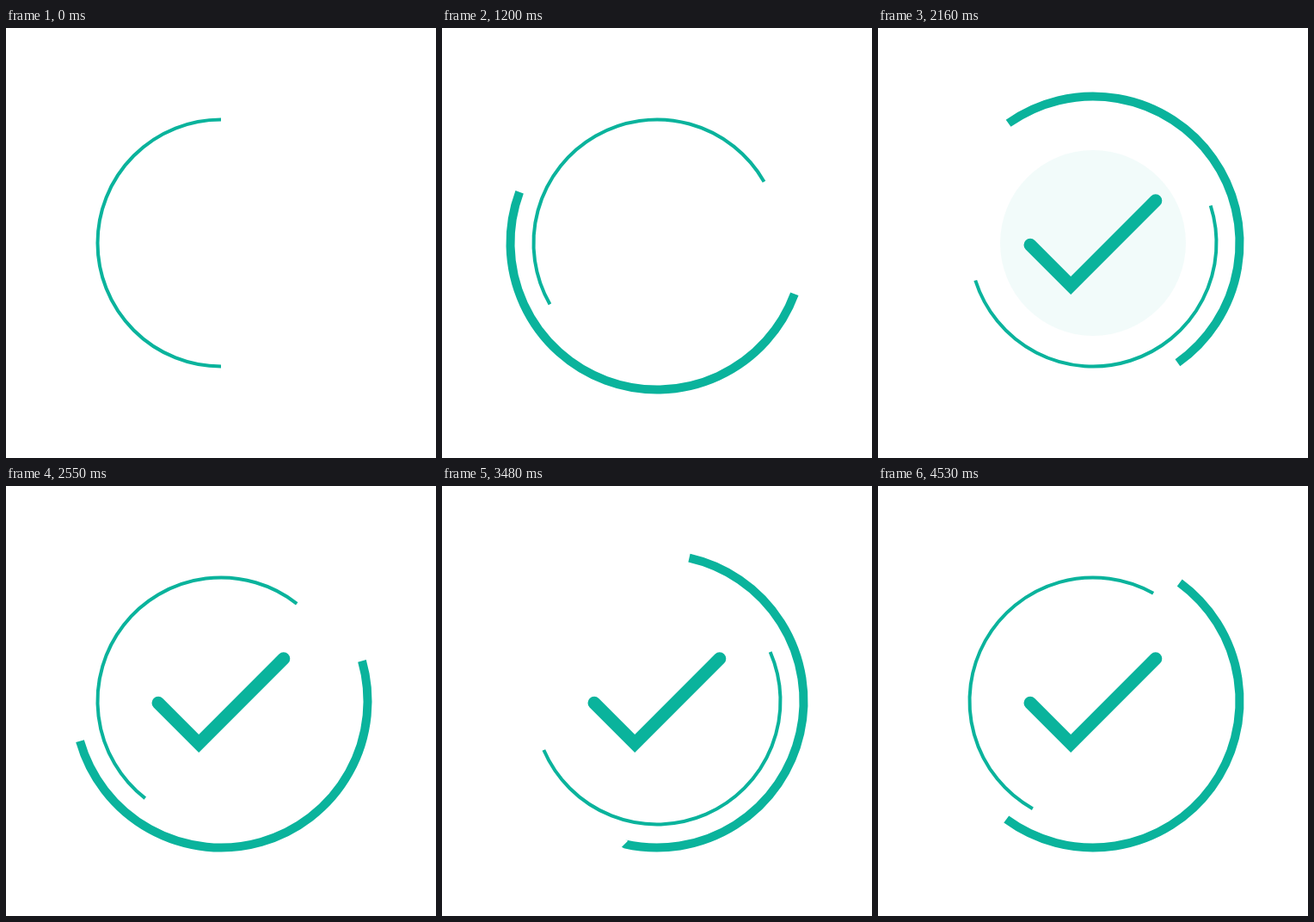
Write an HTML page with a canvas that moves like this. It is 500 px wide and 500 px high and loops after 4.56 s.

```html
<!DOCTYPE html>
<html>
<head>
<meta charset="utf-8">
<style>
html, body { margin: 0; width: 100%; height: 100%; overflow: hidden; background: #fff; }
canvas { display: block; width: 500px; height: 500px; }
</style>
</head>
<body>
<canvas id="stage" width="500" height="500"></canvas>
<script>
const ctx = document.getElementById('stage').getContext('2d');
const LOOP = 4560, STEP = 30, CENTER = 250;
const COLOR = '#0ab39c';
const CHECK = [[177, 252.3], [224.2, 299.5], [322.8, 200.8]];

const clamp = v => Math.min(1, Math.max(0, v));
const smooth = p => p * p * (3 - 2 * p);

// Half ring whose middle points at the given angle (degrees, clockwise from east).
function halfRing(radius, width, degrees) {
  const mid = degrees * Math.PI / 180;
  ctx.lineWidth = width;
  ctx.lineCap = 'butt';
  ctx.beginPath();
  ctx.arc(CENTER, CENTER, radius, mid - Math.PI / 2, mid + Math.PI / 2);
  ctx.stroke();
}

// Starts at rest and approaches a constant top speed.
function outerAngle(steps) {
  const tau = 80, topSpeed = 13.568;
  return topSpeed * (steps - tau * (1 - Math.exp(-steps / tau)));
}

function ripple(progress) {
  if (progress <= 0 || progress >= 1) return;
  const peak = 0.6;
  const fade = progress < peak ? progress / peak : (1 - progress) / (1 - peak);
  ctx.globalAlpha = 0.21 * fade;
  ctx.beginPath();
  ctx.arc(CENTER, CENTER, 120 * progress, 0, 2 * Math.PI);
  ctx.fill();
  ctx.globalAlpha = 1;
}

function checkMark(progress) {
  if (progress <= 0) return;
  const [a, b, c] = CHECK;
  const first = Math.hypot(b[0] - a[0], b[1] - a[1]);
  const second = Math.hypot(c[0] - b[0], c[1] - b[1]);
  const drawn = progress * (first + second);
  const toward = (p, q, k) => ctx.lineTo(p[0] + (q[0] - p[0]) * k, p[1] + (q[1] - p[1]) * k);
  ctx.lineWidth = 15;
  ctx.lineCap = 'round';
  ctx.lineJoin = 'miter';
  ctx.beginPath();
  ctx.moveTo(...a);
  toward(a, b, clamp(drawn / first));
  if (drawn > first) toward(b, c, clamp((drawn - first) / second));
  ctx.stroke();
}

function draw(step) {
  ctx.fillStyle = '#fff';
  ctx.fillRect(0, 0, 500, 500);
  ctx.fillStyle = ctx.strokeStyle = COLOR;
  ripple((step - 45.7) / 18);
  ripple((step - 55.8) / 18);
  halfRing(143.5, 4, 180 - 16.495 * step);
  if (step >= 1) halfRing(170.5, 10, outerAngle(step - 1));
  checkMark(smooth(clamp((step - 42) / 14)));
}

const start = performance.now();
function tick() {
  const elapsed = Math.max(0, performance.now() - start) % LOOP;
  draw(Math.floor(elapsed / STEP));
  requestAnimationFrame(tick);
}
tick();
</script>
</body>
</html>
```
